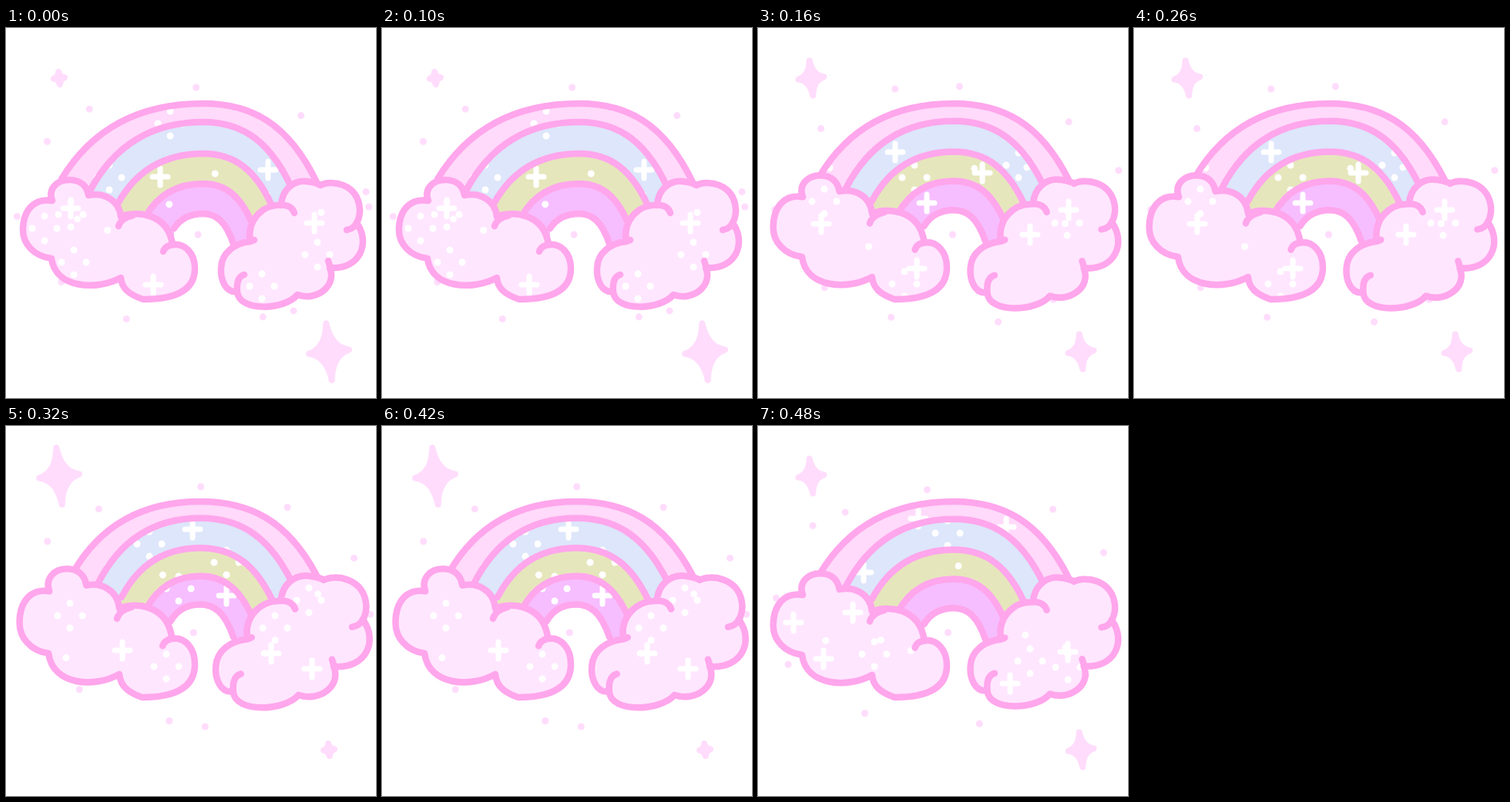
Write an HTML page with a canvas that moves like this. It is 480x480 px and loops after 0.56 s.

```html
<!DOCTYPE html>
<html>
<head>
<meta charset="utf-8">
<title>Rainbow</title>
<style>
html, body { margin: 0; width: 100%; height: 100%; overflow: hidden; background: #fff; }
canvas { display: block; }
</style>
</head>
<body>
<canvas id="stage" width="480" height="480"></canvas>
<script>
const g = document.getElementById('stage').getContext('2d');
const LINE = '#ffa6ec', CLOUD = '#ffe6ff', SPARK = '#ffdcfc', WHITE = '#fff';

// Bands from the outside in, with the height of each crest
const bands = [
  { color: '#ffdafa', top: 98 },
  { color: '#dde6fa', top: 122 },
  { color: '#e6e6bc', top: 163 },
  { color: '#f6bdff', top: 202 },
  { color: WHITE, top: 241 }
];

// Each cloud swells about a fixed point (x, y) by the factors sx, sy
const clouds = [
  { x: 246, y: 352, sx: .02, sy: .075, path: new Path2D(
    'M60 224C54 209 66 197 82 197C97 197 105 205 107 217C125 213 147 222 149 245C165 237 210 238 216 281C232 279 245 292 245 312C245 340 220 352 178 352C160 346 150 338 149 324C118 341 64 338 59 299C36 296 22 280 22 262C22 237 36 220 60 224Z' +
    'M146 257C148 250 156 245 165 243M204 290C206 284 212 281 220 281') },
  { x: 360, y: 288, sx: .085, sy: .05, path: new Path2D(
    'M357 230C358 208 375 197 390 199C398 200 404 201 408 204C420 197 457 200 459 236C459 244 457 249 455 253C473 278 460 314 420 311C430 335 402 355 378 346C362 366 302 369 300 342C284 344 278 325 279 311C280 291 297 279 317 277C312 248 335 228 357 230Z' +
    'M374 240C371 231 363 229 355 230M442 262C448 261 453 258 455 252M418 302L421 312M300 342C299 330 302 322 309 320M317 277L322 275') }
];

// Crosses and four-dot diamonds, as x, y pairs
const glitter = [
  { plus: [200,193, 340,184, 84,234, 191,333, 400,253],
    diamonds: [213,124, 134,194, 50,260, 84,242, 88,304, 332,335, 404,294] },
  { plus: [178,161, 291,188, 219,227, 82,254, 206,312, 403,236, 353,268],
    diamonds: [338,178, 203,194, 86,225, 190,332, 401,253] },
  { plus: [242,134, 286,220, 151,291, 344,295, 397,315],
    diamonds: [186,153, 286,177, 224,211, 83,246, 208,312, 393,226, 349,262] },
  { plus: [208,120, 322,131, 137,190, 46,255, 123,242, 85,302, 402,293, 327,334],
    diamonds: [246,139, 151,296, 353,305, 402,313] }
];

function random(n) {
  const v = Math.sin(n * 12.9898) * 43758.5453;
  return v - Math.floor(v);
}

function pairs(list, fn) {
  for (let i = 0; i < list.length; i += 2) fn(list[i], list[i + 1]);
}

function dot(x, y, color) {
  g.fillStyle = color;
  g.beginPath();
  g.arc(x, y, 4.5, 0, 7);
  g.fill();
}

function stroke(path, color, width) {
  g.strokeStyle = color;
  g.lineWidth = width;
  g.stroke(path);
}

function fill(path, color) {
  g.fillStyle = color;
  g.fill(path);
}

function sparkle(step) {
  const { plus, diamonds } = glitter[step];
  pairs(plus, (x, y) => stroke(new Path2D(`M${x - 10} ${y}h20M${x} ${y - 11}v22`), WHITE, 7));
  pairs(diamonds, (x, y) => {
    for (const d of [-16, 16]) {
      dot(x + d, y, WHITE);
      dot(x, y + d, WHITE);
    }
  });
  for (let i = 1; i < 7; i++) {
    const seed = step * 40 + i;
    dot(i * 65 + 30 * random(seed), 170 + 140 * random(seed + 20), WHITE);
  }
}

// Loose dots on a ring around the picture, and one under the arch
function air(step) {
  for (let i = 0; i < 11; i++) {
    const seed = step * 30 + i;
    const a = (i + .8 * random(seed)) * Math.PI * 2 / 11;
    const r = 1 + .08 * random(seed + 15);
    dot(245 + 218 * r * Math.cos(a), 232 + 150 * r * Math.sin(a), SPARK);
  }
}

function star(x, y, size) {
  const w = 7 + 19 * size, h = 8 + 29 * size, c = w * .14, d = h * .14;
  g.save();
  g.translate(x, y);
  g.rotate(-.1);
  const path = new Path2D(`M0 ${-h}Q${c} ${-d} ${w} 0Q${c} ${d} 0 ${h}Q${-c} ${d} ${-w} 0Q${-c} ${-d} 0 ${-h}Z`);
  fill(path, SPARK);
  stroke(path, SPARK, 8);
  g.restore();
}

function arc(top, i, puff) {
  const x = 256 - 4 * puff, y = top - 2.4 * i * puff;
  const left = 72 + 36.5 * i + (15 - 5 * i) * puff, leftY = 196 + 16 * i - 6 * puff;
  const right = 403 - 27 * i, rightY = 200 + 20 * i - 6 * puff;
  const w = x - left, h = leftY - y, rw = right - x, rh = rightY - y;
  const line = new Path2D(`M${left} ${leftY}
    C${left + .2 * w} ${leftY - .62 * h} ${x - .48 * w} ${y} ${x} ${y}
    C${x + .42 * rw} ${y} ${right - .25 * rw} ${rightY - .75 * rh} ${right} ${rightY}`);
  const area = new Path2D(line);
  area.lineTo(right, 282);
  area.lineTo(left, 282);
  return { line, area };
}

function draw(step) {
  const puff = (1 - Math.cos(step * Math.PI / 2)) / 2;
  g.clearRect(0, 0, 480, 480);
  g.lineCap = g.lineJoin = 'round';
  air(step);

  const arcs = bands.map((band, i) => arc(band.top, i, puff));
  arcs.forEach(({ area }, i) => fill(area, bands[i].color));
  sparkle(step);
  arcs.forEach(({ line }) => stroke(line, LINE, 8.5));
  dot(240 + 20 * random(step + 5), 268, SPARK);

  for (const { x, y, sx, sy, path } of clouds) {
    const shape = new Path2D();
    shape.addPath(path, new DOMMatrix().translate(x, y).scale(1 + sx * puff, 1 + sy * puff).translate(-x, -y));
    fill(shape, CLOUD);
    g.save();
    g.clip(shape);
    sparkle(step);
    g.restore();
    stroke(shape, LINE, 8.5);
  }
  star(69, 65, puff);
  star(419, 420, 1 - puff);
}

function tick() {
  draw(Math.floor(performance.now() % 560 / 160));
  requestAnimationFrame(tick);
}
tick();
</script>
</body>
</html>
```
